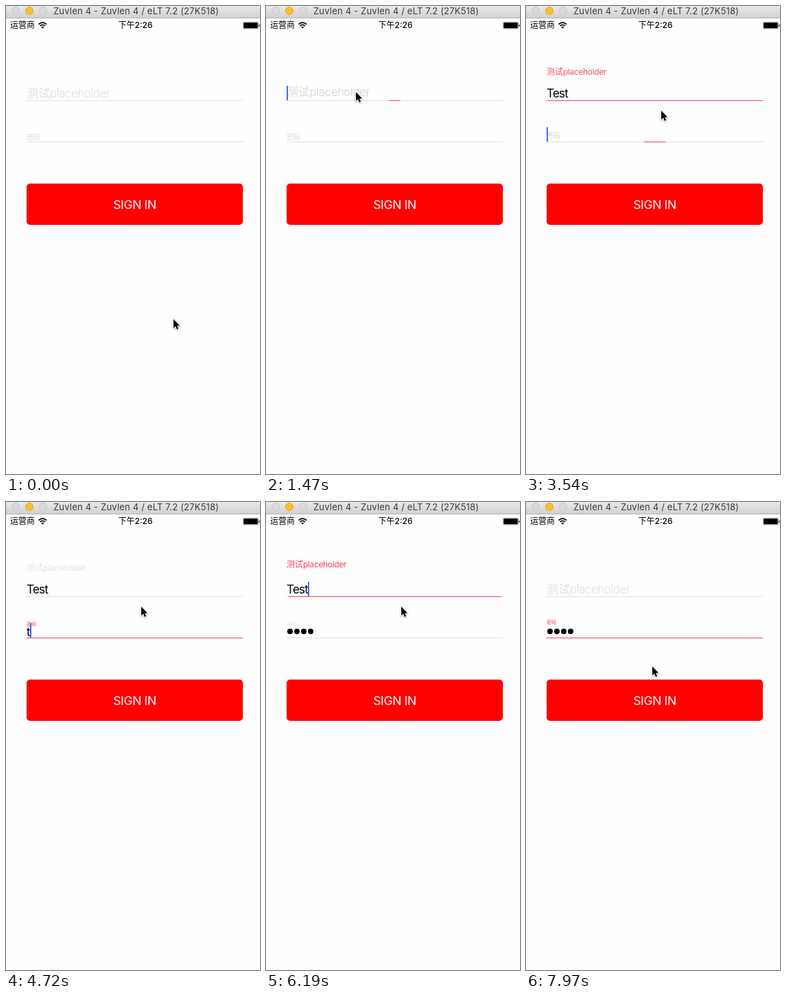
An HTML page that plays this animation: 370 by 680 pixels, repeating every 8 s.

```html
<!DOCTYPE html>
<html lang="zh">
<head>
<meta charset="utf-8">
<title>Sign in</title>
<style>
  html, body { margin: 0; width: 100%; height: 100%; overflow: hidden; }
  body {
    position: relative; background: #fefefe; color: #000;
    font: 17px/20px Inter, "Noto Sans CJK SC", "Noto Sans CJK", sans-serif;
  }
  body > * { position: absolute; white-space: nowrap; }

  .bar {
    left: 0; top: 0; width: 370px; height: 17px;
    background: linear-gradient(#e9e9e9, #d1d1d1); border-bottom: 1px solid #b4b4b4;
  }
  .bar span {
    position: absolute; left: 69px; top: -1px; color: #3a3a3a;
    font-size: 13px; line-height: 17px; letter-spacing: .19px;
  }
  .bar i {
    position: absolute; top: 1px; width: 10px; height: 10px; border-radius: 50%;
    background: #dadada; border: 1px solid #c6c6c6;
  }
  .bar .mid { background: #fdbe2f; border-color: #e5a52b; }
  .status { top: 18px; font-size: 12px; }
  .clock { left: 0; width: 377px; text-align: center; font-weight: 500; }
  svg { left: 0; top: 0; overflow: visible; }

  .rule, .active { left: 30px; width: 315px; height: 1px; background: #e0e0e0; }
  .active { background: #fb3f5b; }
  .one { top: 137px; }
  .two { top: 197px; }

  .label { left: 30px; line-height: 20px; }
  .label span { letter-spacing: -.03em; }
  .field { letter-spacing: -.045em; }
  #name { left: 30px; top: 117px; }
  #pass { left: 30px; top: 177px; line-height: 24px; }
  .field b { position: absolute; top: -1px; width: 2px; height: 21px; background: #486af0; }
  .field i {
    display: inline-block; width: 8.4px; height: 8.4px; margin: 0 .8px;
    border-radius: 50%; background: #000; vertical-align: 2.6px;
  }

  .button {
    left: 30px; top: 258px; width: 315px; height: 60px; border-radius: 5px;
    background: #f00; color: #fff; text-align: center;
    font-size: 17.5px; line-height: 61px; letter-spacing: -.02em;
  }

  .move { animation: 8s ease-in-out infinite paused; }
  #label1 { top: 117px; font-weight: 300; animation-name: label1; }
  #label2 { top: 180px; font-weight: 300; animation-name: label2; }
  #line1 { animation-name: line1; }
  #line2 { animation-name: line2; }
  #cursor { animation-name: cursor; }

  @keyframes label1 {
    0%, 17.625% { font-size: 17px; transform: none; color: #dedede; }
    22.625% { font-size: 12px; transform: translateY(-34px); color: #fb3f5b; font-weight: 400; }
    25.5%, 43.125% { font-size: 12px; transform: translateY(-31px); color: #fb3f5b; font-weight: 400; }
    48.125%, 72.85% { font-size: 12px; transform: translateY(-31px); color: #e2e2e2; font-weight: 400; }
    77.85%, 88.5% { font-size: 12px; transform: translateY(-36px); color: #fb3f5b; font-weight: 400; }
    93.25%, 100% { font-size: 17px; transform: none; color: #e6dcdd; }
  }
  @keyframes label2 {
    0%, 43.125% { font-size: 10px; transform: none; color: #dadada; }
    48.125%, 72.85% { font-size: 7px; transform: translateY(-12px); color: #fb3f5b; }
    77.85%, 88.5% { font-size: 7px; transform: translateY(-12px); color: #e2e2e2; }
    93.25%, 100% { font-size: 7px; transform: translateY(-15px); color: #fb3f5b; }
  }
  @keyframes line1 {
    0%, 17.625% { transform: scaleX(0); opacity: 1; }
    22.625%, 45% { transform: none; opacity: 1; }
    48.125% { transform: none; opacity: 0; }
    48.13%, 72.84% { transform: scaleX(0); opacity: 0; }
    72.85% { transform: scaleX(0); opacity: 1; }
    77.85%, 90.8% { transform: none; opacity: 1; }
    93.25%, 100% { transform: none; opacity: 0; }
  }
  @keyframes line2 {
    0%, 43.125% { transform: scaleX(0); opacity: 1; }
    48.125%, 74.8% { transform: none; opacity: 1; }
    77.2% { transform: none; opacity: 0; }
    77.3%, 88.49% { transform: scaleX(0); opacity: 0; }
    88.5% { transform: scaleX(0); opacity: 1; }
    93.25%, 100% { transform: none; opacity: 1; }
  }
  @keyframes cursor {
    0% { transform: translate(244px, 455px); }
    14.6%, 19.4% { transform: translate(131px, 125px); }
    25.5%, 92.5% { transform: translate(197px, 152px); }
    99.5%, 100% { transform: translate(184px, 239px); }
  }
</style>
</head>
<body>
  <div class="bar">
    <i style="left:8px"></i><i class="mid" style="left:28px"></i><i style="left:48px"></i>
    <span>Zuvlen 4 - Zuvlen 4 / eLT 7.2 (27K518)</span>
  </div>
  <div class="status" style="left:6px">运营商</div>
  <div class="status clock">下午2:26</div>
  <svg width="370" height="40">
    <g fill="none" stroke="#000" stroke-width="1.8">
      <path d="M47.6 26.6a8 8 0 0 1 11.4 0M49.7 29a5 5 0 0 1 7.2 0"/>
      <path d="M53.3 32.8l-2-2.1a2.9 2.9 0 0 1 4 0z" fill="#000" stroke="none"/>
    </g>
    <rect x="345.5" y="23.5" width="22" height="9.5" rx="1.5" fill="#fff" stroke="#999"/>
    <rect x="346.3" y="24.3" width="20.4" height="7.9" rx=".8"/>
    <path d="M368.5 26.5q1.3.4 1.3 1.8t-1.3 1.8z"/>
  </svg>

  <div class="rule one"></div>
  <div class="rule two"></div>
  <div class="active one move" id="line1"></div>
  <div class="active two move" id="line2"></div>
  <div class="label move" id="label1">测试<span>placeholder</span></div>
  <div class="label move" id="label2">密码</div>
  <div class="field" id="name"></div>
  <div class="field" id="pass"></div>
  <div class="button">SIGN IN</div>

  <svg class="move" id="cursor" width="14" height="20" style="filter:drop-shadow(0 1px 1px #0005)">
    <path d="M0 0V13L2.9 10.3 5 15 7.1 14.1 5.1 9.5H9.2Z" stroke="#fff" stroke-width="1.6" paint-order="stroke"/>
  </svg>

<script>
  const LOOP = 8000, STEP = 147.5, LEAD = 12;

  // time, name text, password text, field that holds the caret (0 = none)
  const states = [
    [0, '', '', 0],
    [1410, '', '', 1],
    [2480, 'T', '', 1],
    [2630, 'Te', '', 1],
    [2780, 'Tes', '', 1],
    [2930, 'Test', '', 1],
    [3450, 'Test', '', 2],
    [4260, 'Test', 't', 2],
    [4850, 'Test', '•e', 2],
    [5150, 'Test', '••s', 2],
    [5440, 'Test', '•••t', 2],
    [5740, 'Test', '••••', 2],
    [5828, 'Test', '••••', 1],
    [6470, 'Tes', '••••', 1],
    [6620, 'Te', '••••', 1],
    [6770, 'T', '••••', 1],
    [6910, '', '••••', 1],
    [7090, '', '••••', 2],
    [7800, '', '••••', 0]
  ];

  const nameBox = document.getElementById('name');
  const passBox = document.getElementById('pass');
  const moves = document.getAnimations();
  let shown = null;

  function fill(box, text, caret) {
    box.innerHTML = text.replace(/•/g, '<i></i>') + (caret ? '<b></b>' : '');
  }

  function draw(now) {
    const t = Math.floor((now % LOOP + LEAD) / STEP) * STEP;
    for (const m of moves) m.currentTime = t;
    const state = states.findLast(s => s[0] <= t);
    if (state !== shown) {
      shown = state;
      fill(nameBox, state[1], state[3] === 1);
      fill(passBox, state[2], state[3] === 2);
    }
  }

  const start = performance.now();
  function tick() {
    draw(performance.now() - start);
    requestAnimationFrame(tick);
  }
  tick();
</script>
</body>
</html>
```
